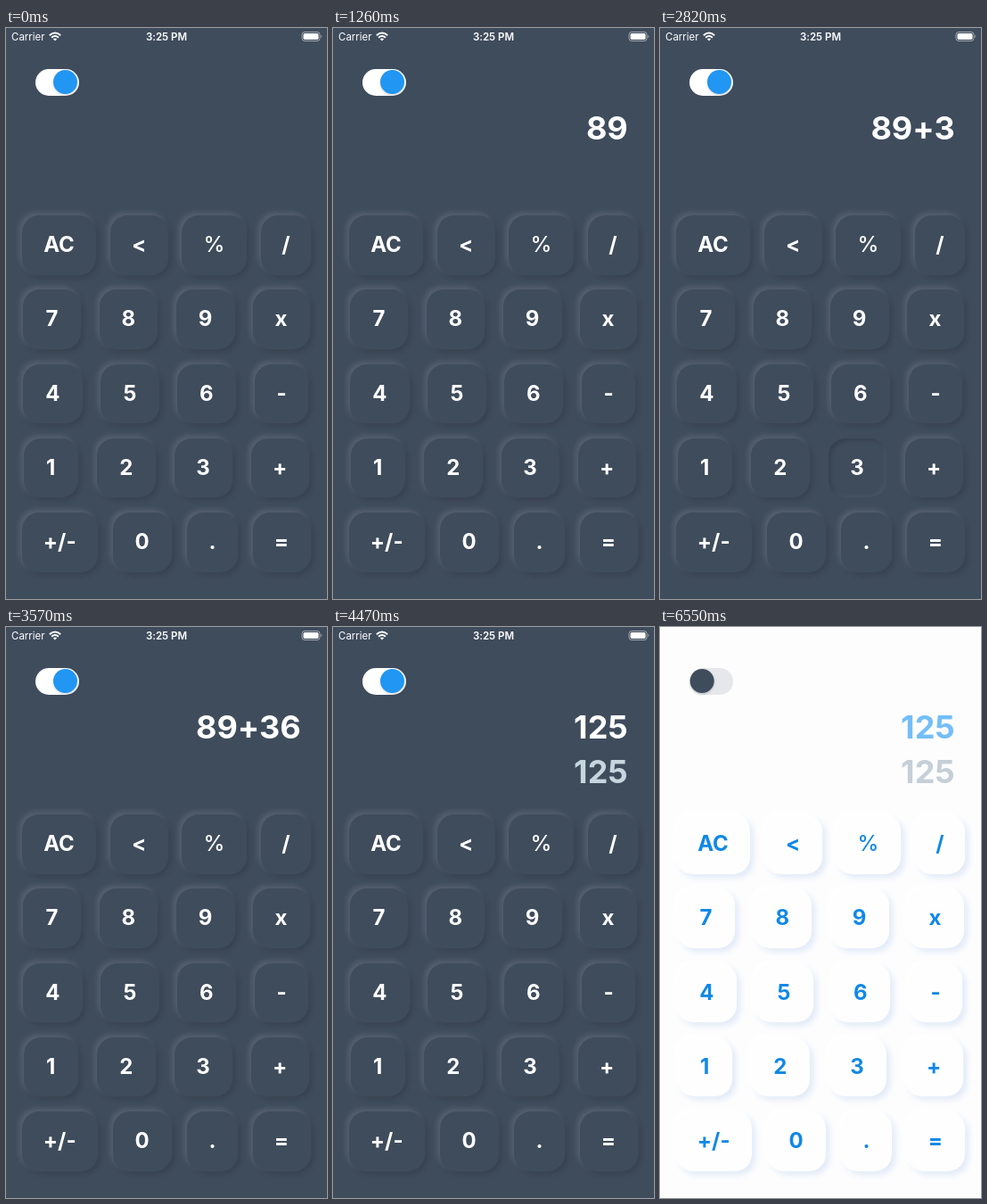
An HTML page that plays this animation: 360 by 640 pixels, repeating every 8000 ms.

```html
<!DOCTYPE html>
<html lang="en">
<head>
<meta charset="utf-8">
<title>Calculator</title>
<style>
  html, body { margin: 0; width: 100%; height: 100%; overflow: hidden; }
  #app {
    --bg: #3f4c5c; --key: #3f4c5c; --ink: #fff; --sum: #fff; --res: #c6d6de;
    --up: -3px -3px 6px rgba(255,255,255,.13), 3px 3px 6px rgba(0,0,0,.14);
    --knob: #2196f3;
    position: relative; width: 360px; height: 640px; overflow: hidden;
    background: var(--bg); color: var(--ink);
    font-family: Inter, sans-serif; font-weight: 700;
    font-feature-settings: "calt" 0;
  }
  #app.light {
    --bg: #fdfdfe; --key: #fefeff; --ink: #1188e6; --sum: #74bef8; --res: #c5cfd8;
    --up: -3px -3px 6px #fff, 4px 4px 7px #e0eaf7;
    --knob: #3f4c5c;
  }
  #app > * { position: absolute; }
  .status { top: 0; left: 0; width: 360px; height: 20px; color: #fff; font-size: 11.5px; line-height: 20px; }
  .status > * { position: absolute; top: 0; }
  .carrier { left: 6px; font-weight: 400; }
  .clock { left: 0; width: 360px; text-align: center; font-weight: 600; }
  .light .status { display: none; }
  .track { left: 33px; top: 46px; width: 49px; height: 29.5px; border-radius: 15px; background: #fff; }
  .knob {
    position: absolute; left: 20px; top: 1.2px; width: 27px; height: 27px; border-radius: 50%;
    background: var(--knob); box-shadow: 0 1.5px 3px rgba(0,0,0,.16);
  }
  .line { right: 29.3px; height: 40px; font-size: 36px; line-height: 40px; white-space: pre; }
  .sum { top: 92px; color: var(--sum); }
  .res { top: 142px; color: var(--res); }
  .key {
    height: 66.5px; border-radius: 19px; background: var(--key); box-shadow: var(--up);
    font-size: 24px; line-height: 66.5px; text-align: center;
  }
  .key.down { box-shadow: inset 3px 3px 5px rgba(0,0,0,.15), inset -2px -2px 4px rgba(255,255,255,.05); }
  .thin { font-weight: 500; }
</style>
</head>
<body>
<div id="app">
  <div class="status">
    <span class="carrier">Carrier</span>
    <span class="clock">3:25 PM</span>
    <svg width="360" height="20" fill="none" stroke="#fff">
      <g stroke-width="2">
        <path d="M48.8 8.2Q55 2.8 61.2 8.2M51.1 10.7Q55 7.3 58.9 10.7"/>
        <path d="M55 14.6L52.8 12.3Q55 10.6 57.2 12.3Z" fill="#fff" stroke="none"/>
      </g>
      <rect x="332" y="4.5" width="20" height="10" rx="3" stroke-opacity=".5"/>
      <rect x="333.5" y="6" width="17" height="7" rx="1.7" fill="#fff" stroke="none"/>
      <path d="M353.3 7.8Q355.3 9.5 353.3 11.2Z" fill="#fff" fill-opacity=".5" stroke="none"/>
    </svg>
  </div>
  <div class="track"><div class="knob"></div></div>
  <div class="line sum"></div>
  <div class="line res"></div>
</div>
<script>
const LOOP = 8000;
const app = document.getElementById('app');
const find = s => app.querySelector(s);
const sum = find('.sum'), res = find('.res'), track = find('.track'), knob = find('.knob');

// label, left, width
const rows = [
  [['AC', 18, 83], ['<', 116.5, 65.5], ['%', 197, 73], ['/', 286, 56]],
  [['7', 19, 65], ['8', 104.5, 65.5], ['9', 190.5, 66], ['x', 276.5, 64]],
  [['4', 19, 66.5], ['5', 106, 66], ['6', 192, 65.5], ['-', 279, 60]],
  [['1', 19.5, 61.5], ['2', 102, 65.5], ['3', 188.5, 65], ['+', 274.5, 65.5]],
  [['+/-', 17.5, 85.5], ['0', 119.5, 66], ['.', 203, 57], ['=', 276.5, 65]]
];
const keys = {};
rows.forEach((row, r) => row.forEach(([label, x, w]) => {
  const key = document.createElement('div');
  key.className = label === '%' ? 'key thin' : 'key';
  key.textContent = label;
  key.style.cssText = `left:${x}px;top:${210 + r * 83.3}px;width:${w}px`;
  app.append(key);
  keys[label] = key;
}));

// key, pressed at, released at, display, result
const presses = [
  ['8', 500, 620, '8', ''],
  ['9', 1160, 1260, '89', ''],
  ['+', 2180, 2310, '89+', ''],
  ['3', 2820, 2960, '89+3', ''],
  ['6', 3430, 3570, '89+36', ''],
  ['=', 4360, 4470, '125', '125']
];
// time, knob shift, track colour
const slides = [
  [0, 0, '#fff'],
  [6330, 0, '#fdfdfe'],
  [6440, -13, '#efeff2'],
  [6550, -19.3, '#e6e7eb']
];
const THEME_AT = 6330;

function draw(t) {
  let shown = '', result = '';
  for (const [label, from, to, text, total] of presses) {
    keys[label].classList.toggle('down', t >= from && t < to);
    if (t >= from) [shown, result] = [text, total];
  }
  sum.textContent = shown;
  res.textContent = result;
  app.classList.toggle('light', t >= THEME_AT);
  const [, shift, colour] = slides.filter(s => t >= s[0]).pop();
  knob.style.transform = `translateX(${shift}px)`;
  track.style.background = colour;
}

const start = performance.now();
function tick() {
  draw((performance.now() - start) % LOOP);
  requestAnimationFrame(tick);
}
draw(0);
requestAnimationFrame(tick);
</script>
</body>
</html>
```
